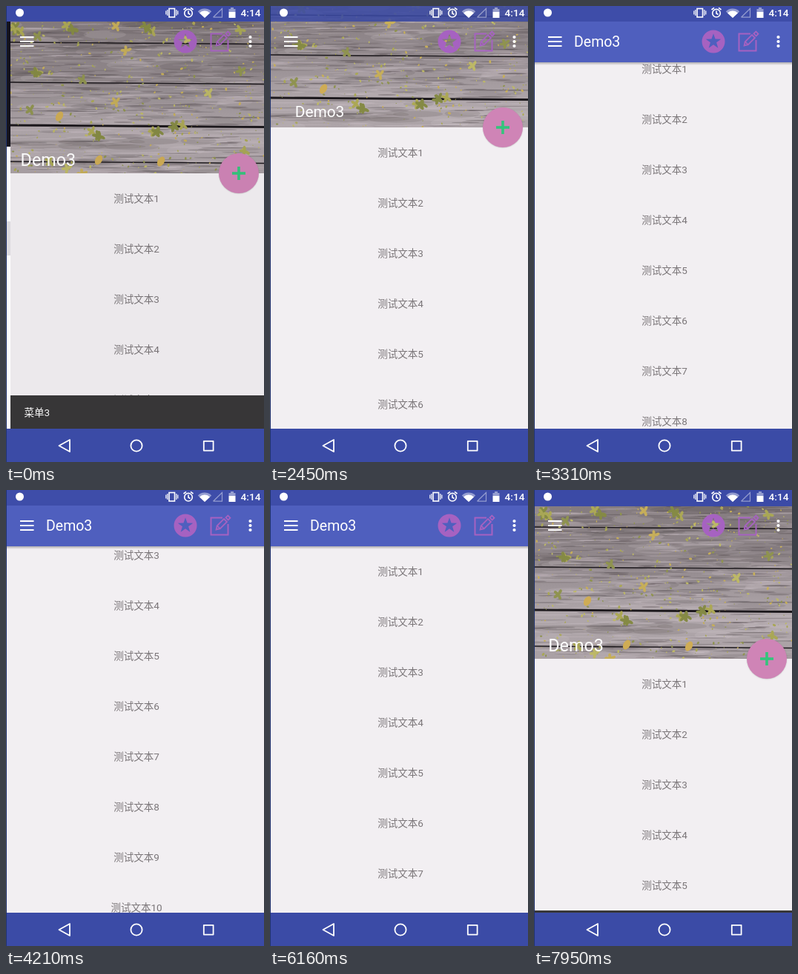
Animation, 348 px wide and 616 px high, one loop 8 s. Source, as an HTML page with a canvas:

```html
<!DOCTYPE html>
<html lang="zh">
<head>
<meta charset="utf-8">
<style>
html, body { margin: 0; width: 100%; height: 100%; overflow: hidden; background: #f2eff2; }
canvas { display: block; width: 348px; height: 616px; }
</style>
</head>
<body>
<canvas id="stage" width="348" height="616"></canvas>
<script>
const W = 348, H = 616, LOOP = 8000, NAV = 571, BAR = 21, ROW = 68, FOLD = 150;
const INDIGO = '#4f5fbe', DARK = '#3b4ba6', PURPLE = '#a662c1', PAPER = '#f2eff2';
const g = document.getElementById('stage').getContext('2d');

const clamp = v => Math.max(0, Math.min(1, v));
const mix = (a, b, p) => a + (b - a) * p;
const span = (t, a, b) => clamp((t - a) / (b - a));
const smooth = p => p * p * (3 - 2 * p);
const slow = p => 1 - (1 - p) * (1 - p);

// Each state is a sum of timed moves
const scrollAt = t => 62 * span(t, 2020, 2450) + 113 * span(t, 2450, 3310)
  + 134 * slow(span(t, 3310, 4270)) + 10 * smooth(span(t, 4530, 4650))
  - 35 * span(t, 5130, 5480) - 134 * span(t, 5480, 5740)
  - 149 * slow(span(t, 6160, 6590)) - 3 * smooth(span(t, 6590, 6940));
const snackAt = t => 526 + 45 * smooth(span(t, 1500, 1790)) - 3 * span(t, 7880, 7950);
const fabAt = t => 1 - smooth(span(t, 2710, 2910)) + smooth(span(t, 6250, 6450));
const scrimAt = t => smooth(span(t, 2700, 3300)) - slow(span(t, 6310, 6910));
const glowAt = t => span(t, 5700, 5800) - span(t, 5800, 5980);

function rect(x, y, w, h, fill) { g.fillStyle = fill; g.fillRect(x, y, w, h); }
function disc(x, y, r, fill) {
  g.fillStyle = fill; g.beginPath(); g.arc(x, y, r, 0, 7); g.fill();
}
function line(color, width, ...pts) {
  g.strokeStyle = color; g.lineWidth = width; g.beginPath();
  for (let i = 0; i < pts.length; i += 2) g.lineTo(pts[i], pts[i + 1]);
  g.stroke();
}
function text(s, x, y, size, color, align = 'left', weight = 400) {
  g.font = `${weight} ${size}px Roboto, "Noto Sans CJK SC", "Noto Sans CJK", sans-serif`;
  g.textAlign = align; g.fillStyle = color; g.fillText(s, x, y);
}

// Weathered boards with scattered leaves
function makeWood() {
  const cv = document.createElement('canvas'), c = cv.getContext('2d'), h = cv.height = 208;
  cv.width = W;
  let seed = 11;
  const rnd = () => (seed = seed * 16807 % 2147483647) / 2147483647;
  const spot = (x, y, rx, ry, color, turn = 0) => {
    c.fillStyle = color; c.beginPath(); c.ellipse(x, y, rx, ry, turn, 0, 7); c.fill();
  };
  const base = c.createLinearGradient(0, 0, 0, h);
  base.addColorStop(0, '#857c7f'); base.addColorStop(.4, '#938a8e'); base.addColorStop(.7, '#b0a7ab');
  base.addColorStop(1, '#a9a0a4');
  c.fillStyle = base; c.fillRect(0, 0, W, h);
  for (let i = 0; i < 90; i++)
    spot(rnd() * W, rnd() * h, 20 + rnd() * 40, 2 + rnd() * 5,
      i % 2 ? 'rgba(75,66,68,.14)' : 'rgba(214,204,210,.16)');
  for (let i = 0; i < 500; i++)
    spot(rnd() * W, rnd() * h, 8 + rnd() * 26, .4 + rnd() * .6,
      i % 2 ? 'rgba(60,52,55,.28)' : 'rgba(215,206,211,.28)');
  for (const y of [29, 83, 141, 190]) {
    c.strokeStyle = '#1d191d'; c.lineWidth = y === 141 ? 3 : 1.6;
    c.beginPath(); c.moveTo(0, y - 1); c.lineTo(W, y + 1.5); c.stroke();
  }
  const tones = ['#a9a756', '#bdb867', '#c6ae5a', '#8f9350'];
  for (let i = 0; i < 520; i++) {
    const r = .6 + 1.7 * rnd() ** 2;
    spot(rnd() * W, rnd() * h, r, r * .65, tones[i % 4], rnd() * 3);
  }
  const leaf = (x, y, color) => {
    for (let a = rnd() * 2, k = 0; k < 4; k++, a += 1.3)
      spot(x + 4 * Math.cos(a), y + 3.5 * Math.sin(a), 3.8, 2, color, a);
  };
  const clumps = [[85, 10], [20, 9], [42, 71], [190, 10], [205, 148], [232, 141], [120, 150]];
  for (const [x, y] of clumps)
    for (let i = 0; i < 3; i++) leaf(x + rnd() * 16 - 8, y + rnd() * 10 - 5, i ? '#858a45' : '#aca855');
  for (let i = 0; i < 16; i++) leaf(rnd() * W, rnd() * h, tones[i % 4]);
  for (const [x, y] of [[209, 189], [125, 187], [72, 128]]) spot(x, y, 4.5, 7, '#cfac55', .5);
  return cv;
}
const wood = makeWood();

function starBadge(x, y) {
  g.fillStyle = PURPLE; g.beginPath(); g.arc(x, y, 15.5, 0, 7); g.closePath();
  for (let i = 0; i < 10; i++) {
    const a = i * Math.PI / 5 - Math.PI / 2, r = i % 2 ? 4.3 : 10.8;
    g[i ? 'lineTo' : 'moveTo'](x + r * Math.cos(a), y + r * Math.sin(a));
  }
  g.closePath(); g.fill('evenodd');
}

function editIcon() {
  line(PURPLE, 2, 292, 37.5, 276.5, 37.5, 276.5, 60.5, 299.5, 60.5, 299.5, 46);
  g.save(); g.translate(291, 46); g.rotate(-Math.PI / 4);
  g.lineWidth = 1.8;
  g.strokeRect(-6, -2.8, 13, 5.6); g.strokeRect(10, -2.2, 4, 4.4);
  line(PURPLE, 1.8, -6, -2.8, -10.5, 0, -6, 2.8);
  g.restore();
}

function toolbar() {
  for (const y of [42, 48, 54]) {
    rect(19, y - 1, 18.5, 2, '#fff');
    disc(329.5, y, 2.1, '#fff');
  }
  starBadge(242, 48);
  editIcon();
}

function statusIcons() {
  const dim = 'rgba(255,255,255,.45)';
  disc(18.5, 9, 5.5, '#fff');
  line('#fff', 1.6, 246, 6.5, 246, 10, 248.5, 11.5);
  g.strokeRect(220, 3.5, 7.5, 11.5);
  g.beginPath(); g.arc(246, 9.7, 5.3, 0, 7); g.stroke();
  for (const side of [-1, 1]) {
    const x = 223.8 + side * 6, a = 246 + side * 3;
    line('#fff', 1.2, x, 5, x, 13);
    line('#fff', 1.2, x + side * 2, 6.5, x + side * 2, 11.5);
    line('#fff', 1.6, a, 2.3, a + side * 3.5, 5);
  }
  for (const [r, c] of [[12.5, dim], [9.5, '#fff']]) {
    g.fillStyle = c; g.beginPath(); g.moveTo(268, 16);
    g.arc(268, 16, r, -2.4, -.74); g.fill();
  }
  line(dim, 1.2, 279.5, 15.2, 291.5, 15.2, 291.5, 3.5, 279.5, 15.2);
  rect(303, 2, 4, 2, dim); rect(300.5, 4, 9, 4, dim); rect(300.5, 8, 9, 8, '#fff');
  text('4:14', 316.5, 14.3, 13.7, '#fff', 'left', 500);
}

function navBar() {
  rect(0, NAV, W, H - NAV, DARK);
  g.lineJoin = 'round';
  line('#fff', 1.8, 71.5, 594, 86, 586, 86, 602, 71.5, 594, 86, 586);
  g.beginPath(); g.arc(176, 594, 7.6, 0, 7); g.stroke();
  g.strokeRect(266.8, 587.8, 12.8, 12.8);
  g.lineJoin = 'miter';
}

function list(scroll, top, glow) {
  g.save();
  g.beginPath(); g.rect(0, top, W, NAV - top); g.clip();
  rect(0, top, W, NAV - top, PAPER);
  for (let n = 1; n <= 20; n++)
    text('测试文本' + n, 176, 197 + ROW * n - scroll, 13.5, '#7b7679', 'center');
  g.fillStyle = `rgba(63,81,181,${.2 * glow})`;
  g.beginPath(); g.ellipse(174, top, 205, 26 * glow, 0, 0, 7); g.fill();
  g.restore();
}

function header(fold, bottom, scrim) {
  g.save();
  g.beginPath(); g.rect(0, 0, W, bottom); g.clip();
  rect(0, 0, W, bottom, DARK);
  g.drawImage(wood, 0, Math.round(BAR - fold * .6));
  g.globalAlpha = scrim; rect(0, 0, W, bottom, INDIGO);
  g.globalAlpha = .85; rect(0, 0, W, BAR, DARK);
  g.restore();
  if (fold === FOLD) {
    const s = g.createLinearGradient(0, bottom, 0, bottom + 4);
    s.addColorStop(0, 'rgba(0,0,0,.28)'); s.addColorStop(1, 'rgba(0,0,0,0)');
    rect(0, bottom, W, 4, s);
  }
  const p = fold / FOLD;
  text('Demo3', mix(19.6, 54, p), mix(216, 55.2, p), mix(23.3, 19.5, slow(p)), '#fff');
}

function fab(y, scale) {
  if (scale <= 0) return;
  g.save(); g.translate(314, y); g.scale(scale, scale);
  g.shadowColor = 'rgba(0,0,0,.2)'; g.shadowBlur = 1.5; g.shadowOffsetY = .5;
  disc(0, 0, 27, '#cf84b6');
  g.shadowColor = 'transparent';
  rect(-9, -1.8, 18, 3.6, '#35c47c'); rect(-1.8, -9, 3.6, 18, '#35c47c');
  g.restore();
}

function snackbar(y) {
  rect(0, y, W, H - y, '#383738');
  text('菜单3', 24.5, y + 27.5, 13.5, '#fff');
}

function drawer(left) {
  if (!left) return;
  rect(0, BAR, W, NAV - BAR, `rgba(0,0,0,${.025 * left})`);
  const w = 5 * left;
  rect(1, BAR, w, 169, '#14131c');
  rect(1, 190, w, NAV - 190, '#fdfdfd');
  rect(1, 291, w, 46, '#dcdade');
}

function draw(t) {
  const scroll = scrollAt(t), fold = Math.min(scroll, FOLD), bottom = Math.round(226 - fold);
  list(scroll, bottom, glowAt(t));
  header(fold, bottom, scrimAt(t));
  toolbar();
  fab(226 - fold, fabAt(t));
  snackbar(snackAt(t));
  drawer(1 - span(t, 50, 200));
  statusIcons();
  navBar();
  rect(0, 0, 1, H, '#22346f');
}

let start;
function frame(now) {
  start ??= now;
  draw((now - start) % LOOP);
  requestAnimationFrame(frame);
}
requestAnimationFrame(frame);
</script>
</body>
</html>
```
